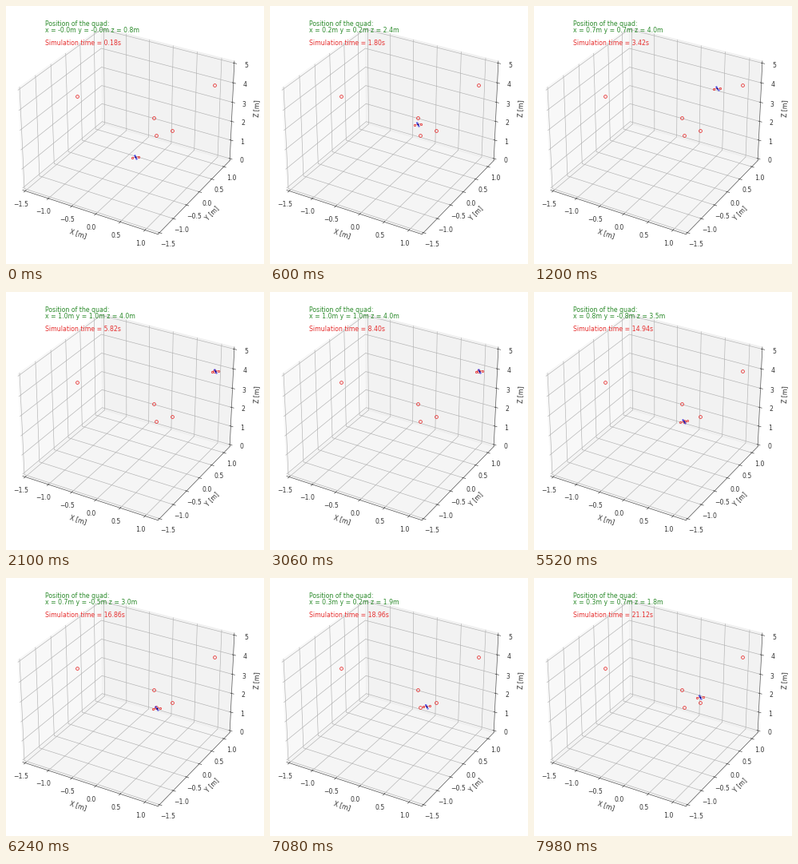
A matplotlib script for the animation above (8000 ms loop, 323 by 323 pixels).

```python
import math

import numpy as np
import matplotlib.pyplot as plt
from matplotlib.animation import FuncAnimation
from mpl_toolkits.mplot3d import proj3d

SIZE = 323
DPI = 56
STEP_MS, TICK_MS, LOOP_MS = 60, 20, 8000
PT = 72 / DPI  # points per pixel
ARM = 0.043

INK, RED, GREEN, BLUE = "#333333", "#e62e2e", "#2a8a2a", "#2a2ae0"

plt.rcParams.update({
    "font.family": "DejaVu Sans", "axes.labelcolor": INK,
    "axes.edgecolor": "#444444", "xtick.color": INK, "ytick.color": INK,
})

WAYPOINTS = [(1, 1, 4), (-1, -0.52, 3.86), (0, 0.53, 2.2),
             (0.78, -0.8, 3.49), (0.3, 0.7, 1.5)]

# Each leg: first step, goal, steps each coordinate takes to settle
START = np.array([-0.049, -0.049, 0.8])
LEGS = [(0, (1.01, 1.01, 4.0), (32.5, 32.5, 20)),
        (54, (0.78, -0.8, 3.49), (20, 32, 23)),
        (94, (0.3, 0.7, 1.8), (30, 38, 29))]


def smooth(s):
    s = np.clip(s, 0, 1)
    return s * s * (3 - 2 * s)


def position(step):
    p = START
    for first, goal, span in LEGS:
        p = p + (goal - p) * smooth((step - first) / np.array(span))
    return p


def sim_time(step):
    """Clock in whole ticks of 0.06 s, a little slower near the end."""
    return 0.06 * math.ceil(np.interp(step, [0, 104, 133], [3, 281, 352]))


def padded(lo, hi):
    pad = (hi - lo) / 48
    return lo - pad, hi + pad


fig = plt.figure(figsize=(SIZE / DPI + 1e-5,) * 2, dpi=DPI, facecolor="white")

# Static 3D box, rendered once and kept as a backdrop
box = fig.add_axes(np.array([-1.9, 18.2, 301.5, 301.5]) / SIZE,
                   projection="3d")
box.view_init(elev=30, azim=-60)
box.set(xlim=padded(-1.5, 1.2), ylim=padded(-1.5, 1.2), zlim=padded(0, 5),
        xlabel="X [m]", ylabel="Y [m]", zlabel="Z [m]")
box.set_xticks(np.arange(-1.5, 1.1, 0.5))
box.set_yticks(np.arange(-1.5, 1.1, 0.5))
box.set_zticks(range(6))
fig.canvas.draw()
backdrop = np.array(fig.canvas.buffer_rgba())
view = box.M


def to_pixels(points):
    x, y, _ = proj3d.proj_transform(*np.transpose(points), view)
    return box.transData.transform(np.column_stack([x, y])).T


way_px = to_pixels(WAYPOINTS)
box.set_visible(False)
fig.figimage(backdrop)

# Pixel-sized layer for everything above the backdrop
top = fig.add_axes([0, 0, 1, 1], zorder=5)
top.set(xlim=(0, SIZE), ylim=(0, SIZE))
top.axis("off")


def dots(color, size, **style):
    return top.plot([], [], "o", ms=size * PT, color=color, **style)[0]


def arm(color, width):
    return top.plot([], [], color=color, lw=width * PT)[0]


def label(y, color, text=""):
    return top.text(48.5, SIZE - y, text, color=color, fontsize=10,
                    va="baseline")


hollow = dict(mfc="none", mew=0.8 * PT)
dots(RED, 3.8, **hollow).set_data(*way_px)
red_arm, blue_arm = arm(RED, 0.5), arm(BLUE, 0.9)
red_tips = dots(RED, 2.2, **hollow)
blue_tips = dots(BLUE, 1.6, alpha=0.7, **hollow)
hub = dots("navy", 2.0, mew=0)

label(24.6, GREEN, "Position of the quad:")
place = label(33.2, GREEN)
clock = label(48.6, RED)


def draw(i):
    step = i * TICK_MS // STEP_MS
    p = position(step)
    along, across = np.array([ARM, ARM, 0]), np.array([ARM, -ARM, 0])
    red = to_pixels([p - along, p + along])
    blue = to_pixels([p - across, p + across])
    for line, xy in ((red_arm, red), (red_tips, red), (blue_arm, blue),
                     (blue_tips, blue), (hub, to_pixels([p]))):
        line.set_data(*xy)
    place.set_text("x = {:.1f}m y = {:.1f}m z = {:.1f}m".format(*p))
    clock.set_text(f"Simulation time = {sim_time(step):.2f}s")
    return red_arm, blue_arm, red_tips, blue_tips, hub, place, clock


anim = FuncAnimation(fig, draw, frames=LOOP_MS // TICK_MS, interval=TICK_MS,
                     init_func=lambda: draw(0), repeat=True, repeat_delay=0)
plt.show()
```
